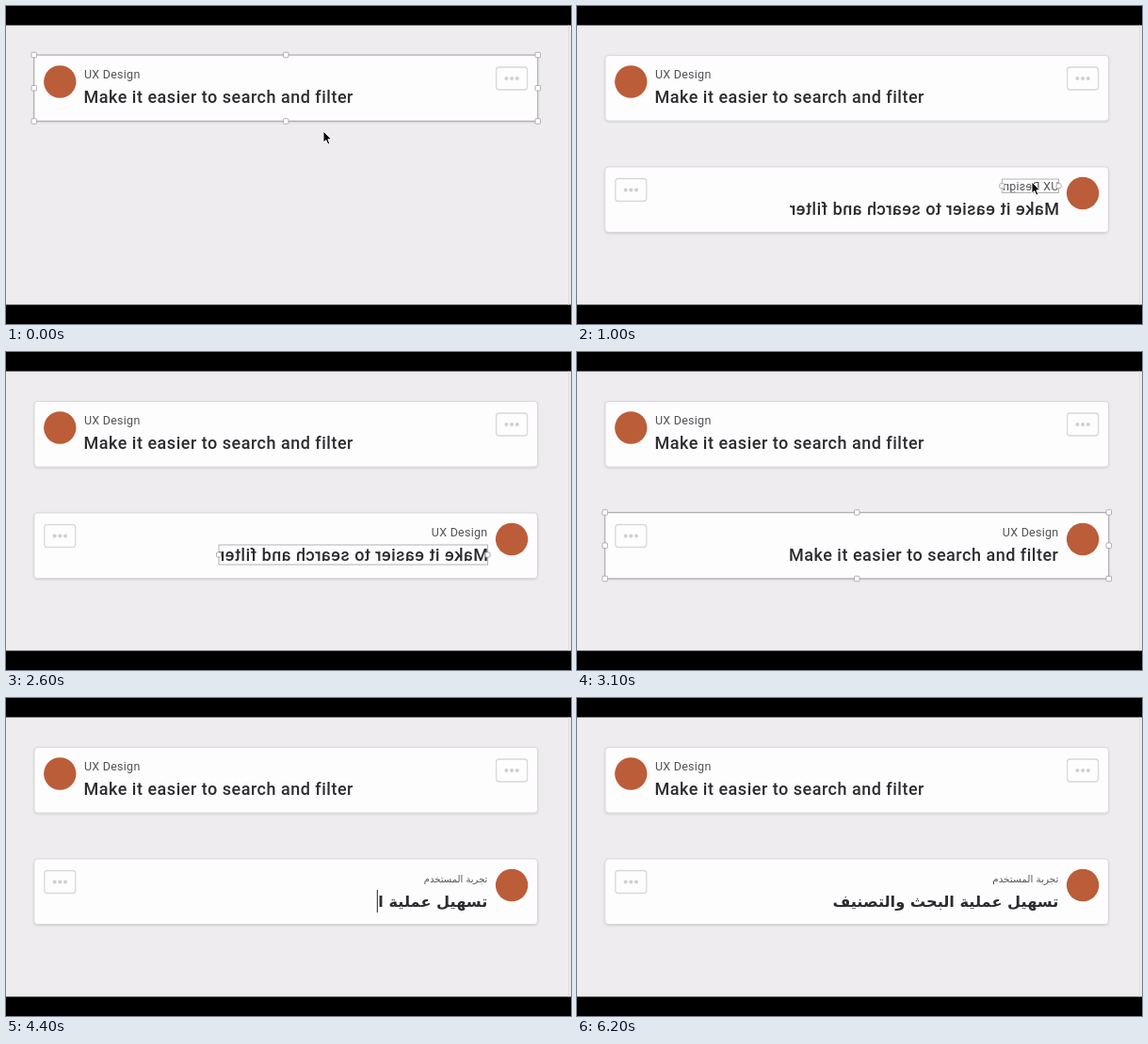
These frames come from a looping animation (600 px wide and 338 px high, 6.3 s). An HTML page:

```html
<!DOCTYPE html>
<html lang="en">
<head>
<meta charset="utf-8">
<style>
html, body { margin: 0; width: 100%; height: 100%; overflow: hidden; background: #000; }
svg { display: block; }
text { font-family: Roboto, Inter, sans-serif; white-space: pre; }
.sub { font-size: 12.5px; letter-spacing: .25px; fill: #555257; }
.title { font-size: 18px; font-weight: 500; letter-spacing: .5px; fill: #2d2b2f; }
.arabic { font-family: "DejaVu Sans", sans-serif; letter-spacing: 0; direction: rtl; }
.sub.arabic { font-size: 10px; }
.sub.arabic.final { font-size: 10.4px; }
.title.arabic { font-size: 16.2px; font-weight: 700; }
.pill { font: 600 8.5px Inter, sans-serif; fill: #fff; text-anchor: middle; }
</style>
</head>
<body>
<svg width="600" height="338" viewBox="0 0 600 338">
  <defs>
    <filter id="shadow" x="-2%" y="-10%" width="104%" height="125%">
      <feDropShadow dx="0" dy="1" stdDeviation="1" flood-opacity=".14"/>
    </filter>
    <g id="panel">
      <rect x="30" y="52.5" width="534.6" height="69.5" rx="3.5" fill="#fefdfe" stroke="#d6d4d7" stroke-width=".9" filter="url(#shadow)"/>
      <circle cx="57.3" cy="80.5" r="17.2" fill="#bb5d39"/>
      <rect x="520.6" y="65" width="33" height="24" rx="3" fill="none" stroke="#d9d7da" stroke-width="1.3"/>
      <g fill="#d0ced1">
        <circle cx="531.4" cy="77" r="2"/><circle cx="537.1" cy="77" r="2"/><circle cx="542.8" cy="77" r="2"/>
      </g>
    </g>
  </defs>
  <rect y="20.5" width="600" height="297" fill="#eeecee"/>
  <path d="M597.5 20.5V317.5" stroke="#dddbdd"/>
  <use href="#panel"/>
  <text class="sub" x="83" y="77.3">UX Design</text>
  <text class="title" x="82.5" y="103.2">Make it easier to search and filter</text>
  <g id="copy">
    <use id="copyPanel" href="#panel"/>
    <text id="sub" y="77.3"></text>
    <text id="title" y="103.2"></text>
  </g>
  <g id="overlay"></g>
  <path id="cursor" d="M0 0V12.2L2.8 9.6 4.8 14.1 6.9 13.2 4.9 8.8H8.6Z" fill="#000" stroke="#fff" stroke-width="1"/>
</svg>
<script>
const $ = id => document.getElementById(id);
const LOOP = 6300, STEP = 100, DROP = 118.5, MID = 297.2;
const FLIP = `translate(${2 * MID}) scale(-1 1)`;
const SUB = { latin: 'UX Design', arabic: 'تجربة المستخدم' };
const TITLE = { latin: 'Make it easier to search and filter', arabic: 'تسهيل عملية البحث والتصنيف' };

// Piecewise linear value through [time, ...values] keys
function track(keys, t) {
  const i = keys.findIndex(k => k[0] > t);
  if (i < 0) return keys.at(-1).slice(1);
  if (i === 0) return keys[0].slice(1);
  const a = keys[i - 1], b = keys[i], p = (t - a[0]) / (b[0] - a[0]);
  return a.slice(1).map((v, j) => v + (b[j + 1] - v) * p);
}

const between = (t, a, b) => t >= a && t < b;
const dragKeys = [[200, 0], [300, 44], [400, 100.7], [500, DROP]];
const cursorKeys = [[0, 337, 133], [200, 334, 69.5], [300, 334, 113.5], [400, 334, 170], [500, 334, 188],
  [700, 334, 188], [900, 483, 187], [1700, 483, 187], [1900, 470, 208]];

function setText(el, kind, mode, content, done) {
  const fromRight = mode === 'end' || mode === 'arabic';
  const left = kind === 'sub' ? 83 : 82.5;
  el.setAttribute('class', `${kind} ${mode} ${done ? 'final' : ''}`);
  el.setAttribute('x', fromRight ? 511.4 : left);
  el.setAttribute('text-anchor', mode === 'end' ? 'end' : 'start');
  el.setAttribute('transform', mode === 'mirror' ? FLIP : '');
  if (el.textContent !== content) el.textContent = content;
}

function selection(x1, y1, x2, y2, size, sidesOnly) {
  const cx = (x1 + x2) / 2, cy = (y1 + y2) / 2;
  const points = [[x1, cy], [x2, cy]];
  if (!sidesOnly) for (const x of [x1, cx, x2]) points.push([x, y1], [x, y2]);
  const handles = points.map(([x, y]) =>
    `<rect x="${x - size / 2}" y="${y - size / 2}" width="${size}" height="${size}" rx=".8" fill="#fff"/>`);
  return `<g stroke="#aaa8ab" stroke-width=".9"><rect x="${x1}" y="${y1}" width="${x2 - x1}" height="${y2 - y1}" fill="none"/>${handles.join('')}</g>`;
}

const cardSelection = dy => selection(29.7, 52 + dy, 564.8, 122.5 + dy, 5.5);

function guides(dy) {
  const bottom = 122 + dy, top = 52.5 + dy, gap = top - 122.5, y = 122.5 + gap / 2;
  let out = `<path d="M${MID} 20.5V317.5M30 52V${bottom}M564.8 52V${bottom}" stroke="#c75846" stroke-width="1.2" fill="none"/>`;
  if (gap > 0) out += `<path d="M30 ${top}H564.6" stroke="#b9b7ba"/>
    <path d="M294 122.8h6.4M294 ${top}h6.4M${MID} 122.8V${top}" stroke="#2a8df0" stroke-width="1.2"/>
    <rect x="273" y="${y - 5.6}" width="20.6" height="11" rx="5.5" fill="#0f80f2"/>
    <text class="pill" x="283.3" y="${y + 3}">${Math.round(gap * 1.1)}</text>`;
  return out;
}

function caret(el, y1, y2) {
  const x = 510.4 - el.getComputedTextLength();
  return `<path d="M${x} ${y1}V${y2}" stroke="#222"/>`;
}

function draw(t) {
  const [dy] = track(dragKeys, t);
  const flipped = t >= 700;
  $('copy').setAttribute('transform', `translate(0 ${dy})`);
  $('copy').setAttribute('visibility', t > 200 ? 'visible' : 'hidden');
  $('copyPanel').setAttribute('transform', flipped ? FLIP : '');

  const done = t >= 5800;
  const mode = (unflip, type) => t >= type ? 'arabic' : t >= unflip ? 'end' : flipped ? 'mirror' : 'plain';
  const typed = (words, start, rate) =>
    t > start ? words.arabic.slice(0, Math.round((t - start) * rate)) : words.latin;
  setText($('sub'), 'sub', mode(1600, 3300), typed(SUB, 3200, 14 / 400), done);
  setText($('title'), 'title', mode(2900, 4100), typed(TITLE, 4000, 13 / 400), done);

  let marks = '';
  if (t < 300) marks += cardSelection(0);
  if (between(t, 300, 600)) marks += guides(dy);
  if (between(t, 600, 900) || between(t, 3000, 3200)) marks += cardSelection(DROP);
  if (between(t, 1000, 2000)) marks += selection(451.3, 184, 511.6, 198.5, 5, true);
  if (between(t, 2000, 3000)) marks += selection(226, 205, 511.6, 226, 5, true);
  if (between(t, 3300, 3900)) marks += caret($('sub'), 184, 200.5);
  if (between(t, 4100, 5200)) marks += caret($('title'), 204, 228);
  $('overlay').innerHTML = marks;

  $('cursor').setAttribute('transform', `translate(${track(cursorKeys, t).join(' ')})`);
  $('cursor').setAttribute('visibility', t < 2300 ? 'visible' : 'hidden');
}

function tick() {
  draw(Math.floor(performance.now() % LOOP / STEP) * STEP);
  requestAnimationFrame(tick);
}
tick();
</script>
</body>
</html>
```
